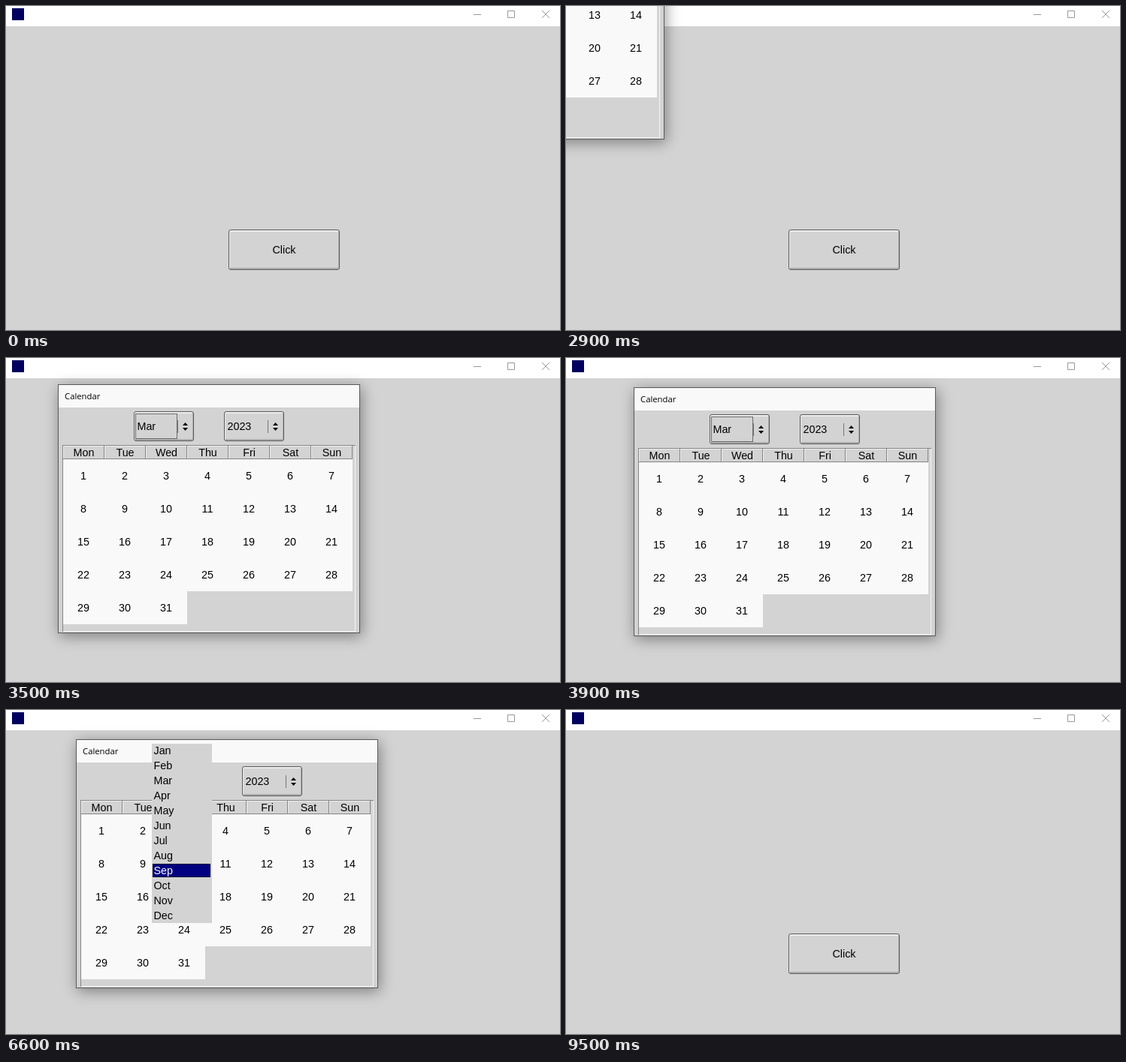
An HTML page with a canvas that plays this animation: 737 px wide and 432 px high, repeating every 9.6 s.

```html
<!DOCTYPE html>
<html lang="en">
<head>
<meta charset="utf-8">
<title>Calendar dialog</title>
<style>
html, body { margin: 0; width: 737px; height: 432px; overflow: hidden; background: #d3d3d3; }
canvas { display: block; }
</style>
</head>
<body>
<canvas id="stage" width="737" height="432"></canvas>
<script>
const W = 737, H = 432, LOOP = 9600, TICK = 100;
const stage = document.getElementById('stage').getContext('2d');
const layer = document.createElement('canvas');
layer.width = W;
layer.height = H;
const dlg = layer.getContext('2d');

const GREY = '#d3d3d3', CELL = '#f9f9f9';
const FONT = '14.3px "Liberation Sans", Arial, sans-serif';
const MONTHS = 'Jan Feb Mar Apr May Jun Jul Aug Sep Oct Nov Dec'.split(' ');
const DAYS = 'Mon Tue Wed Thu Fri Sat Sun'.split(' ');
const FEB = 1, MAR = 2;
const DLG_W = 401, DLG_H = 331;

// [time, highlighted month] while the list is open
const PICKS = [[5100, 2], [5600, 1], [5800, 4], [5900, 7], [6100, 8], [6200, 9],
  [6300, 10], [6400, 11], [6600, 8], [6700, 6], [6800, 4], [6900, 2], [7100, 1]];

function rect(c, color, x, y, w, h) {
  c.fillStyle = color;
  c.fillRect(x, y, w, h);
}

function text(c, str, x, y, align = 'left', color = '#000', font = FONT) {
  c.font = font;
  c.textAlign = align;
  c.textBaseline = 'alphabetic';
  c.fillStyle = color;
  c.fillText(str, x, y);
}

function bevel(c, x, y, w, h, pressed) {
  const hi = pressed ? '#a9a9a9' : '#ececec', lo = pressed ? '#e6e6e6' : '#adadad';
  rect(c, pressed ? '#cbcbcb' : GREY, x, y, w, h);
  rect(c, hi, x + 2, y + 1, w - 4, 2);
  rect(c, hi, x + 1, y + 2, 1, h - 4);
  rect(c, lo, x + 2, y + h - 3, w - 4, 2);
  rect(c, lo, x + w - 2, y + 2, 1, h - 4);
  c.strokeStyle = '#5c5c5c';
  c.lineWidth = 1;
  c.beginPath();
  c.roundRect(x + .5, y + .5, w - 1, h - 1, 2.5);
  c.stroke();
}

function dotted(c, x, y, w, h) {
  c.save();
  c.strokeStyle = '#000';
  c.lineWidth = 1;
  c.setLineDash([1, 1]);
  c.strokeRect(x + .5, y + .5, w - 1, h - 1);
  c.restore();
}

function triangle(c, x, y, dy) {
  c.fillStyle = '#000';
  c.beginPath();
  c.moveTo(x - 3.5, y);
  c.lineTo(x + 3.5, y);
  c.lineTo(x, y + dy);
  c.fill();
}

function combo(c, x, y, label, focus) {
  bevel(c, x, y, 80, 40);
  rect(c, '#777', x + 58, y + 12, 1, 17);
  triangle(c, x + 68.5, y + 19, -4);
  triangle(c, x + 68.5, y + 22, 4);
  text(c, label, x + 4.5, y + 25);
  if (focus) dotted(c, x + 2, y + 3, 56, 34);
}

function drawWindow(t) {
  const c = stage;
  const active = (t >= 1500 && t < 1900) || (t >= 8300 && t < 9500);
  rect(c, GREY, 0, 0, W, H);
  rect(c, '#fff', 0, 0, W, 27);
  rect(c, '#00005f', 8, 3, 16, 16);
  c.strokeStyle = active ? '#000' : '#999';
  c.lineWidth = 1;
  c.beginPath();
  c.moveTo(622, 11.5);
  c.lineTo(632, 11.5);
  c.rect(667.5, 6.5, 9, 9);
  c.moveTo(713, 6);
  c.lineTo(723, 16);
  c.moveTo(723, 6);
  c.lineTo(713, 16);
  c.stroke();

  const pressed = t === 1600;
  bevel(c, 296, 298, 148, 54, pressed);
  text(c, 'Click', 370, 330, 'center');
  if (active) dotted(c, 299, 301, 142, 48);
}

function dialogPos(t) {
  if (t < 2900) return [-277, -158];
  if (t < 3600) {
    const k = (t - 2900) / 600, e = k * k * (3 - 2 * k);
    return [Math.round(-271 + 340 * e), Math.round(-154 + 189 * e)];
  }
  if (t < 3800) return [70, 35];
  const k = Math.min(1, (t - 3700) / 300), e = k * (2 - k);
  return [Math.round(70 + 23 * e), Math.round(35 + 4 * e)];
}

function drawList(c, x, y, pick) {
  rect(c, GREY, x, y, 80, 239);
  MONTHS.forEach((m, i) => {
    const top = y + 20 * i;
    if (i === pick) {
      rect(c, '#000030', x + 1, top, 77, 18);
      rect(c, '#000080', x + 2, top + 1, 75, 16);
    }
    text(c, m, x + 2.5, top + 14, 'left', i === pick ? '#fff' : '#000');
  });
}

function drawDialog(t) {
  const c = dlg, [x, y] = dialogPos(t);
  const month = t < 7400 ? MAR : FEB;
  const days = month === MAR ? 31 : 28;
  c.clearRect(0, 0, W, H);

  c.save();
  c.shadowColor = 'rgba(0,0,0,.4)';
  c.shadowBlur = 18;
  c.shadowOffsetX = 2;
  c.shadowOffsetY = 4;
  rect(c, '#5a5a5a', x, y, DLG_W + 1, DLG_H + 1);
  c.restore();
  rect(c, GREY, x + 1, y + 1, DLG_W - 1, DLG_H - 1);
  rect(c, CELL, x + 1, y + 1, DLG_W - 1, 30);
  if (month === FEB) rect(c, '#fff', x + 101, y + 6, 80, 25);
  text(c, 'Calendar', x + 9, y + 20, 'left', '#000', '11.3px "Open Sans", "Noto Sans", sans-serif');

  combo(c, x + 101, y + 36, MONTHS[month], true);
  combo(c, x + 221, y + 36, '2023', false);

  // sunken grid frame
  rect(c, '#858585', x + 6, y + 81, 390, 1);
  rect(c, '#858585', x + 6, y + 81, 1, 249);
  rect(c, '#f4f4f4', x + 395, y + 82, 1, 248);
  rect(c, '#f4f4f4', x + 7, y + 329, 389, 1);

  DAYS.forEach((d, i) => {
    const cx = x + 7 + 55 * i;
    rect(c, '#858585', cx, y + 82, 55, 18);
    rect(c, '#f0f0f0', cx, y + 82, 54, 17);
    rect(c, GREY, cx + 1, y + 83, 53, 16);
    text(c, d, cx + 27.5, y + 96, 'center');
  });

  for (let i = 0; i < days; i++)
    rect(c, CELL, x + 7 + 55 * (i % 7), y + 100 + 44 * Math.floor(i / 7), 55, 44);
  if (month === FEB) rect(c, '#fff', x + 101, y + 100, 80, 145);
  if (t >= 8100) rect(c, '#bad8e8', x + 117, y + 144, 55, 44);
  for (let i = 0; i < days; i++)
    text(c, i + 1, x + 34 + 55 * (i % 7), y + 127 + 44 * Math.floor(i / 7), 'center');

  if (t >= 5100 && t < 7400) {
    const pick = PICKS.filter(p => p[0] <= t).pop()[1];
    drawList(c, x + 101, y + 6, pick);
  }
}

function showDialog(t) {
  if (t < 1800 || t >= 8500) return;
  drawDialog(t);
  const fading = t === 1800 || t === 8400;
  stage.save();
  if (fading) {
    const [x, y] = dialogPos(t);
    const cx = x + DLG_W / 2, cy = y + DLG_H / 2;
    stage.globalAlpha = .4;
    stage.translate(cx, cy);
    stage.scale(.95, .95);
    stage.translate(-cx, -cy);
  }
  stage.drawImage(layer, 0, 0);
  stage.restore();
}

const start = performance.now();
function frame() {
  const t = Math.floor(((performance.now() - start) % LOOP) / TICK) * TICK;
  drawWindow(t);
  showDialog(t);
  requestAnimationFrame(frame);
}
frame();
</script>
</body>
</html>
```
